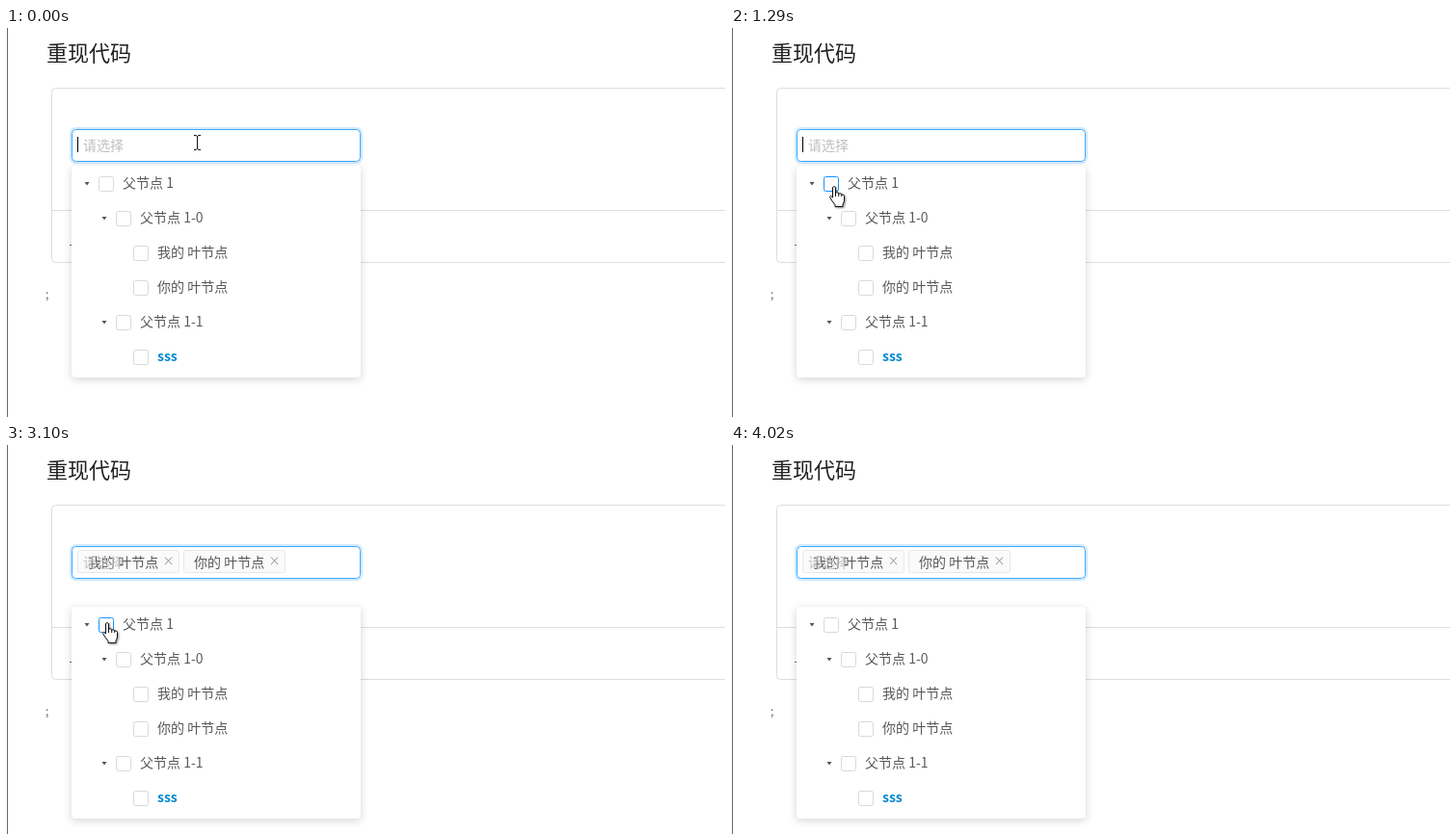
An HTML page for the animation above (4.99 s loop, 746 by 404 pixels).

```html
<!DOCTYPE html>
<html lang="zh-CN">
<head>
<meta charset="utf-8">
<title>Tree select</title>
<style>
html, body { margin: 0; width: 100%; height: 100%; overflow: hidden; background: #fff; }
svg { display: block; width: 746px; height: 404px; font: 14px "Noto Sans CJK SC", "Noto Sans CJK", "Noto Sans", sans-serif; }
text { fill: #595959; white-space: pre; }
.heading { font-size: 22px; fill: #222; }
.small { font-size: 12px; }
.placeholder { fill: #bfbfbf; }
.strong { font-weight: 700; fill: #08c; }
.line { fill: none; stroke: #ddd; }
.select { fill: #fff; stroke: #40a9ff; }
.glow { fill: none; stroke: #1890ff; stroke-opacity: .2; stroke-width: 2; }
.panel { fill: #fff; filter: drop-shadow(0 2px 4px rgba(0, 0, 0, .17)); }
.hover { fill: #e6f7ff; }
.box { fill: #fff; stroke: #d9d9d9; }
.fill { fill: #1890ff; }
.tick { fill: none; stroke: #fff; stroke-width: 2; }
.tag rect { fill: #fafafa; stroke: #e8e8e8; }
.tag path { fill: none; stroke: #8c8c8c; }
.pointer { fill: #fff; stroke: #111; stroke-linejoin: round; filter: drop-shadow(1.5px 1.5px 1px rgba(0, 0, 0, .45)); }
.beam { fill: none; stroke: #111; }
</style>
</head>
<body>
<svg viewBox="0 0 746 404">
  <rect x="1" width="1" height="404" fill="#666"/>
  <text class="heading" x="42" y="34">重现代码</text>
  <path class="line" id="card"/>
  <g id="below">
    <path class="line" d="M48 189.5H746"/>
    <rect x="66" y="225" width="2" height="1" fill="#666"/>
    <text class="small" x="41" y="281">;</text>
  </g>
  <rect class="glow" id="glow" x="67" y="104" width="302" rx="5"/>
  <rect class="select" id="select" x="68.5" y="105.5" width="299" rx="4"/>
  <g id="tags"></g>
  <text class="placeholder" id="placeholder" x="80" y="127">请选择</text>
  <rect id="caret" x="74" y="113" width="1" height="16"/>
  <g id="dropdown">
    <rect class="panel" x="68" y="143" width="300" height="220" rx="4"/>
  </g>
  <g id="cursor">
    <path class="beam" id="beam" d="M-3 -7.5H-1L.5 -6.5 2 -7.5H4M.5 -6.5V6.5M-3 7.5H-1L.5 6.5 2 7.5H4"/>
    <path class="pointer" id="arrow" d="M.5 .5V16.5L4.2 13 6.8 19 9.4 17.9 6.9 12.1H12Z"/>
    <path class="pointer" id="hand" d="M-1.5 12V1.5q1.5-2 3 0V7q3-1 3.2 1q2.8-.8 3 1q2.6-.6 2.8 1.5V15q0 2-1.5 4V21.5H1V19.5q-3.5-4-5.5-8q.5-2.5 3 .5ZM1.5 7v4M4.7 8v3M7.7 9v2"/>
  </g>
</svg>
<script>
const LOOP = 4990, CHECK = 1490, CHECKED = 1620, UNCHECK = 3100, GROWTH = 25;
const START = [198, 119];
// Each move: first change, last change, number of changes, end point.
const MOVES = [
  [460, 770, 7, 147, 181], [820, 970, 4, 141, 178],
  [1000, 1100, 3, 142, 191], [1140, 1290, 4, 107, 164],
  [2030, 2180, 4, 107, 185], [2410, 2410, 1, 105, 184],
  [3610, 3790, 5, 241, 269], [3835, 3975, 4, 548, 398]
];
const GONE = 4020;
const NODES = [
  [0, '父节点 1'], [1, '父节点 1-0'], [2, '我的 叶节点'],
  [2, '你的 叶节点'], [1, '父节点 1-1'], [2, 'sss']
];
const TAGS = [[74, 109, 106, '我的 叶节点'], [184, 109, 106, '你的 叶节点'], [74, 136, 50, 'sss']];

const $ = id => document.getElementById(id);

function add(parent, name, attrs = {}, text = '') {
  const node = document.createElementNS(parent.namespaceURI, name);
  for (const key in attrs) node.setAttribute(key, attrs[key]);
  node.textContent = text;
  return parent.appendChild(node);
}

const show = (node, on) => node.setAttribute('visibility', on ? 'visible' : 'hidden');
const textClass = label => label === 'sss' ? 'strong' : '';

const rows = NODES.map(([level, label], i) => {
  const x = 96 + level * 18, y = 161 + i * 36, panel = $('dropdown');
  const hover = add(panel, 'rect', { class: 'hover', x: x + 20, y: y - 14, width: 246 - level * 18, height: 27, rx: 2 });
  if (level < 2) add(panel, 'path', { d: `M${x - 14.5} ${y - 1}h5l-2.5 3.5z`, fill: '#555' });
  const box = add(panel, 'rect', { class: 'box', x: x + .5, y: y - 6.5, width: 15, height: 15, rx: 2 });
  const mark = add(panel, 'g');
  add(mark, 'rect', { class: 'fill', x, y: y - 7, width: 16, height: 16, rx: 2 });
  add(mark, 'path', { class: 'tick', d: `M${x + 3.8} ${y + .8}l3 3 5.4-6` });
  add(panel, 'text', { x: x + 25, y: y + 5, class: textClass(label) }, label);
  return { x, y, hover, box, mark };
});

const tags = TAGS.map(([x, y, width, label]) => {
  const tag = add($('tags'), 'g', { class: 'tag' });
  add(tag, 'rect', { x: x + .5, y: y + .5, width: width - 1, height: 23, rx: 2 });
  add(tag, 'text', { x: x + 11, y: y + 18, class: textClass(label) }, label);
  add(tag, 'path', { d: `M${x + width - 15} ${y + 7.5}l7 7.5m0-7.5l-7 7.5` });
  return tag;
});

// Fraction of a stepped change that has been shown by time t.
function stepped(t, first, last, count) {
  if (t < first) return 0;
  if (t >= last) return 1;
  return (Math.floor((t - first) / (last - first) * (count - 1) + 1e-6) + 1) / count;
}

function cursorAt(t) {
  let [x, y] = START;
  for (const [first, last, count, toX, toY] of MOVES) {
    const part = stepped(t, first, last, count);
    x += (toX - x) * part;
    y += (toY - y) * part;
  }
  return [x, y];
}

function draw(t) {
  const open = t >= CHECK && t < UNCHECK;
  const grow = open ? GROWTH : 0;
  const drop = t >= CHECK ? GROWTH : 0;
  const appear = stepped(t, CHECK, CHECKED, 4);
  const [x, y] = cursorAt(t);
  const localY = y - drop;
  const resting = t >= 1290 && t < 3610;

  $('card').setAttribute('d', `M746 62.5H51.5q-4 0-4 4V${239.5 + grow}q0 4 4 4H746`);
  $('below').setAttribute('transform', `translate(0 ${grow})`);
  $('select').setAttribute('height', 33 + grow);
  $('glow').setAttribute('height', 36 + grow);
  $('dropdown').setAttribute('transform', `translate(0 ${drop})`);
  show($('placeholder'), !open);
  show($('caret'), t < CHECK && (t < 500 || t >= 1030));

  tags.forEach((tag, i) => {
    show(tag, t >= CHECK && (i < 2 || open));
    tag.setAttribute('opacity', appear);
  });

  let clickable = resting;
  for (const row of rows) {
    const inRow = t < GONE && localY >= row.y - 14 && localY < row.y + 13;
    const onTitle = inRow && x >= row.x + 20 && x < 362;
    const onBox = inRow && x >= row.x && x < row.x + 16;
    clickable = clickable || onTitle || onBox;
    show(row.hover, onTitle);
    row.box.style.stroke = onBox ? '#1890ff' : '';
    show(row.mark, open);
    row.mark.setAttribute('opacity', appear);
  }

  const kind = clickable ? 'hand' : t < CHECK && y < 139 ? 'beam' : 'arrow';
  for (const id of ['beam', 'arrow', 'hand']) show($(id), t < GONE && id === kind);
  $('cursor').setAttribute('transform', `translate(${Math.round(x)} ${Math.round(y)})`);
}

const begin = performance.now();
function frame() {
  draw((performance.now() - begin) % LOOP);
  requestAnimationFrame(frame);
}
draw(0);
requestAnimationFrame(frame);
</script>
</body>
</html>
```
